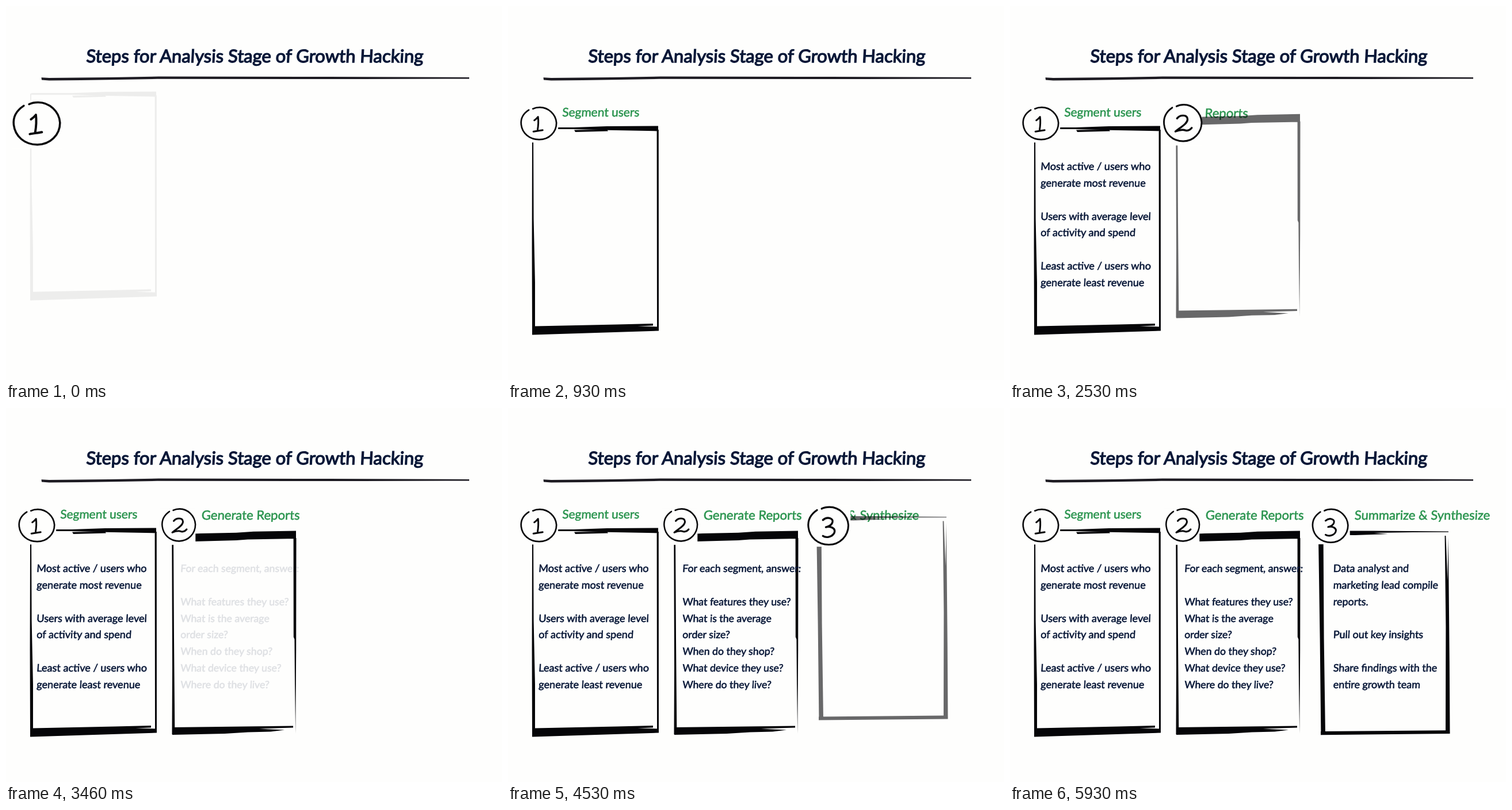
An HTML page that plays this animation: 862x650 px, repeating every 8 s.

```html
<!DOCTYPE html>
<html lang="en">
<head>
<meta charset="utf-8">
<title>Steps for Analysis Stage</title>
<style>
  html, body { margin: 0; width: 100%; height: 100%; overflow: hidden; background: #fefefd; }
  svg { display: block; width: 862px; height: 650px; }
  text { font-family: Lato, "Open Sans", sans-serif; fill: #091838; stroke: #091838; stroke-width: .6px; white-space: pre; }
  .title { font-size: 31px; stroke-width: 1.3px; }
  .heading { fill: #2c9550; stroke: #2c9550; }
  .badge path { fill: none; stroke: #08080a; stroke-width: 2.7; stroke-linecap: round; stroke-linejoin: round; }
  .badge .digit { stroke-width: 3; }
  .badge rect { fill: #fefefd; }
</style>
</head>
<body>
<svg id="stage" viewBox="0 0 862 650">
  <text class="title" transform="translate(139 97.8) skewX(-3)">Steps for Analysis Stage of Growth Hacking</text>
  <path fill="#1d1b22" d="M61.5 124.2 L75 125 L180 124 L265 122.6 L560 123 L805 124 V126.4 L620 127 L263 126.8 L180 128.2 L130 129 L75 129.4 L62 128.4Z"/>
</svg>
<script>
const FPS = 15, LOOP = 8000;
const RING = "M-17 -23.5 C-27 -17 -31.5 -8 -30.3 2 C-28.5 17 -16 28 1 28 C18 28 31 15 31 -1 C30 -16 17 -28 2 -28 C-3 -28 -7 -27 -10 -25.5";

const cards = [
  {
    start: -1, bodyStart: 21, x: 53.2, y: 204.2, ringScale: "1 1",
    mask: [-33, -31, 67, 64],
    digit: "M-7.5 -5.5 C-5 -7 -3 -9 -1 -11.5 C0 -4 -.5 4 -2 12.5 M-9 14 C-4 13 2 12.5 7 11.5",
    heading: "Segment users", headX: 94, headY: 191.5, headSize: 20.9, slide: 200,
    bodyX: 53, bodySize: 18.1,
    lines: ["Most active / users who", "generate most revenue", "",
            "Users with average level", "of activity and spend", "",
            "Least active / users who", "generate least revenue"],
    frame: "M44 211 H115 L172 209 L261 208.4 V217.4 L174 215.8 L115 214 H44Z" +
           "M115 215.6 L172 215 L174 217.4 L117 219Z" +
           "M42 212 H44 L44.6 370 L47 480 V560 L46 570.6 L42 571.4 L41.6 420Z" +
           "M258.6 215 H261.8 L262 564.6 H259Z" +
           "M47 556.4 L190 553.4 L252 552 V555.6 L225 556.4 L262 557.4 V564.6 L42 571.4 V560Z"
  },
  {
    start: 29, bodyStart: 51, x: 300, y: 203.3, ringScale: ".94 1",
    mask: [-33, -29, 62.3, 63.5],
    digit: "M-8.5 -7 C-4 -13 7 -13 7.5 -6 C8 1 -4 7 -11 13 C-4 10 1 10 5 11.5 C9 12 12 10 14 7.5",
    heading: "Generate Reports", headX: 339.5, headY: 194, headSize: 22.1, slide: 242,
    bodyX: 303, bodySize: 17.7,
    lines: ["For each segment, answer:", "", "What features they use?",
            "What is the average", "order size?", "When do they shop?",
            "What device they use?", "Where do they live?"],
    frame: "M305 219.5 L338 218 L400 216.8 L430 214.8 L504 213.4 V227 L420 228.6 L400 230 L325 232 V220.5 H305Z" +
           "M499.6 226 H504.5 L504.2 420 L503.2 566 L502 480 L501.4 402 L499.8 398Z" +
           "M288.3 225 H291 L292 400 L293.3 556 V567 H288.5 L289 450Z" +
           "M289 555 L499 552.4 V555.6 L440 557.4 L484 559.6 L460 562.5 L420 563.4 L380 566 L289 568Z"
  },
  {
    start: 59, bodyStart: 81, x: 556.4, y: 204.8, ringScale: "1 1.03",
    mask: [-34, -31, 68.3, 63],
    digit: "M-8 -9 C-1 -15 9 -11.5 6.5 -5 C5 -1 1 1 -3.5 2 C4 0 12 4 9.5 10.5 C6.5 17 -3 19 -8 15.5",
    heading: "Summarize & Synthesize", headX: 598.5, headY: 194, headSize: 22, slide: 300,
    bodyX: 561.5, bodySize: 18,
    lines: ["Data analyst and", "marketing lead compile", "reports.", "",
            "Pull out key insights", "", "Share findings with the", "entire growth team"],
    frame: "M540 213.6 H632 L762 214.6 V215.8 L700 216 L632 217 L657 219 L600 221 L540 220.5Z" +
           "M755.6 222 H757.4 L760.4 300 L761.8 225 L763.8 440 L764.5 566 H757 L757.4 380Z" +
           "M536 225 H544.6 L545.6 400 L548 566 H540.4 L538.6 400Z" +
           "M540 562 L757 560.2 L764.5 561 V566 L540 568.2Z"
  }
];

const stage = document.getElementById("stage");
const clamp = v => Math.min(1, Math.max(0, v));

function add(parent, tag, attrs = {}, text = "") {
  const node = document.createElementNS(stage.namespaceURI, tag);
  for (const name in attrs) node.setAttribute(name, attrs[name]);
  node.textContent = text;
  return parent.appendChild(node);
}

function addText(parent, text, x, y, size, cls = "") {
  return add(parent, "text", {
    class: cls, "font-size": size, transform: `translate(${x} ${y}) skewX(-3)`
  }, text);
}

function build(card, i) {
  const clip = add(stage, "clipPath", { id: "clip" + i });
  add(clip, "rect", { x: card.headX - 3.5, y: 150, width: 270, height: 70 });

  card.root = add(stage, "g");
  const headWindow = add(card.root, "g", { "clip-path": `url(#clip${i})` });
  card.headNode = add(headWindow, "g");
  addText(card.headNode, card.heading, card.headX, card.headY, card.headSize, "heading");

  card.frameNode = add(card.root, "path", { d: card.frame, fill: "#050508" });

  card.badge = add(card.root, "g", { class: "badge" });
  const [x, y, width, height] = card.mask;
  add(card.badge, "rect", { x, y, width, height });
  add(card.badge, "path", { d: RING, transform: `scale(${card.ringScale})` });
  add(card.badge, "path", { d: card.digit, class: "digit" });

  card.body = add(card.root, "g");
  card.lines.forEach((line, row) =>
    line && addText(card.body, line, card.bodyX, 285.2 + row * 28.8, card.bodySize));
}

function draw(ms) {
  // Three ticks per 200 ms, on 10 ms boundaries
  const part = ms % 200;
  const tick = Math.floor(ms / 200) * 3 + (part >= 130 ? 2 : part >= 60 ? 1 : 0);
  for (const card of cards) {
    const p = clamp((tick - card.start) / FPS), rest = 1 - p;
    card.root.setAttribute("visibility", p > 0 ? "visible" : "hidden");
    card.headNode.setAttribute("transform", `translate(${-card.slide * rest} 0)`);
    card.frameNode.setAttribute("transform", `translate(0 ${-64 * rest})`);
    card.frameNode.setAttribute("opacity", p);
    card.badge.setAttribute("transform", `translate(${card.x} ${card.y}) scale(${1 + rest / 3})`);
    card.body.setAttribute("opacity", clamp((tick - card.bodyStart) / 8));
  }
}

cards.forEach(build);
draw(0);

let origin;
function loop(now) {
  origin ??= now;
  draw((now - origin) % LOOP);
  requestAnimationFrame(loop);
}
requestAnimationFrame(loop);
</script>
</body>
</html>
```
